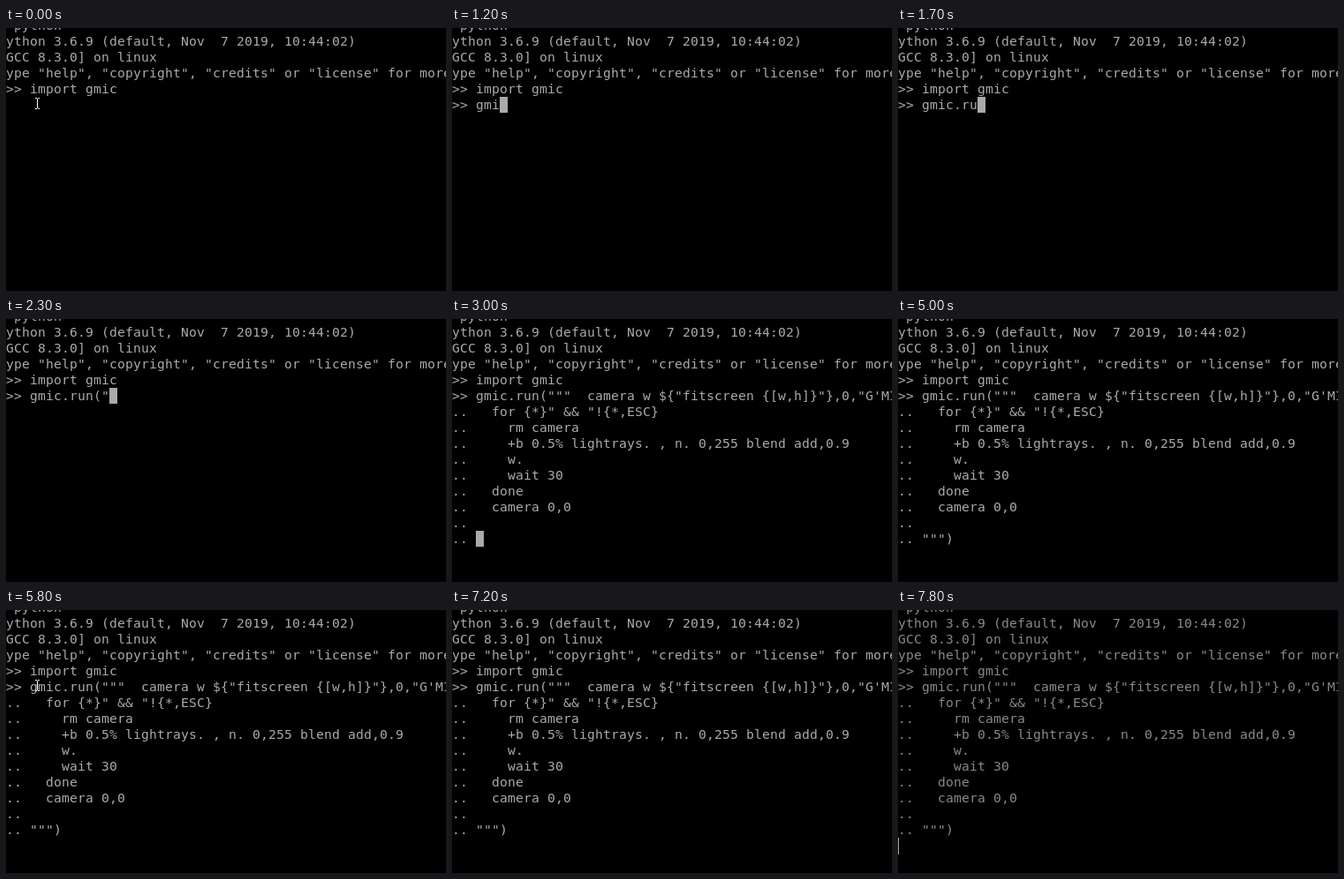
Animation of 498x298 px, one loop 8000 ms. Source, as an HTML page:

```html
<!DOCTYPE html>
<html lang="en">
<head>
<meta charset="utf-8">
<title>Python terminal session</title>
<style>
  html, body { margin: 0; width: 100%; height: 100%; overflow: hidden; background: #000; }
  svg { display: block; }
  text { white-space: pre; font: 11pt "DejaVu Sans Mono", monospace; }
</style>
</head>
<body>
<svg width="498" height="298" viewBox="0 0 498 298">
  <rect width="498" height="298" fill="#000"/>
  <g id="lines"></g>
  <rect id="cursor" width="9" height="18" fill="#aaa"/>
  <rect id="hollow" x="-8.5" y="258.5" width="9" height="18" fill="none" stroke="#aaa"/>
  <path id="pointer" d="M-2.5 -6H-.5M.5 -6H2.5M0 -5.5V5.5M-2.5 6H-.5M.5 6H2.5" fill="none" stroke="#fff"/>
</svg>
<script>
const LOOP = 8000, COL = 9, ROW = 18, TOP = -12, BASELINE = 14;
const el = id => document.getElementById(id);
const show = (node, on) => node.setAttribute('visibility', on ? 'visible' : 'hidden');

// The left edge of the stage hides the first column of the terminal.
const intro = [
  ' python',
  'ython 3.6.9 (default, Nov  7 2019, 10:44:02)',
  'GCC 8.3.0] on linux',
  'ype "help", "copyright", "credits" or "license" for more information.',
  '>> import gmic'
];

const pasted = [
  '>> gmic.run("""  camera w ${"fitscreen {[w,h]}"},0,"G\'MIC"',
  '..   for {*}" && "!{*,ESC}',
  '..     rm camera',
  '..     +b 0.5% lightrays. , n. 0,255 blend add,0.9',
  '..     w.',
  '..     wait 30',
  '..   done',
  '..   camera 0,0',
  '..'
];

const rows = Array.from({ length: intro.length + pasted.length + 1 }, (_, i) => {
  const row = document.createElementNS('http://www.w3.org/2000/svg', 'text');
  row.setAttribute('y', TOP + i * ROW + BASELINE);
  return el('lines').appendChild(row);
});

function typed(text, t, start, interval) {
  return text.slice(0, Math.max(0, Math.floor((t - start) / interval)));
}

function screenAt(t) {
  if (t < 1000) return intro;
  if (t < 3000) return [...intro, '>> ' + typed('gmic.run(', t, 840, 120) + typed('"""', t, 2050, 250)];
  return [...intro, ...pasted, '.. ' + typed('""")', t, 3200, 200)];
}

function setRow(row, value) {
  if (row.textContent === value) return;
  row.textContent = value;
  row.setAttribute('x', Array.from(value, (_, col) => col * COL).join(' '));
}

function drawPointer(t) {
  const returned = t >= 5700 && t < 7200;
  const arriving = t < 5800, leaving = t >= 7100;
  let x = 35.5, y = 85.5;
  if (returned && arriving) { x += 11; y += 18; }
  if (returned && leaving) { x += 113; y -= 38; }
  el('pointer').setAttribute('transform', `translate(${x} ${y})`);
  show(el('pointer'), t < 500 || returned);
}

function render(t) {
  const lines = screenAt(t);
  rows.forEach((row, i) => setRow(row, lines[i] || ''));

  const unfocused = t >= 7800;
  el('lines').setAttribute('fill', unfocused ? '#8a888a' : '#aaa');
  show(el('hollow'), unfocused);

  const last = lines.length - 1;
  el('cursor').setAttribute('x', lines[last].length * COL);
  el('cursor').setAttribute('y', TOP + last * ROW);
  show(el('cursor'), (t >= 200 && t < 600) || (t >= 1000 && t < 5000));

  drawPointer(t);
}

const start = performance.now();
function tick() {
  render((performance.now() - start) % LOOP);
  requestAnimationFrame(tick);
}
tick();
</script>
</body>
</html>
```
